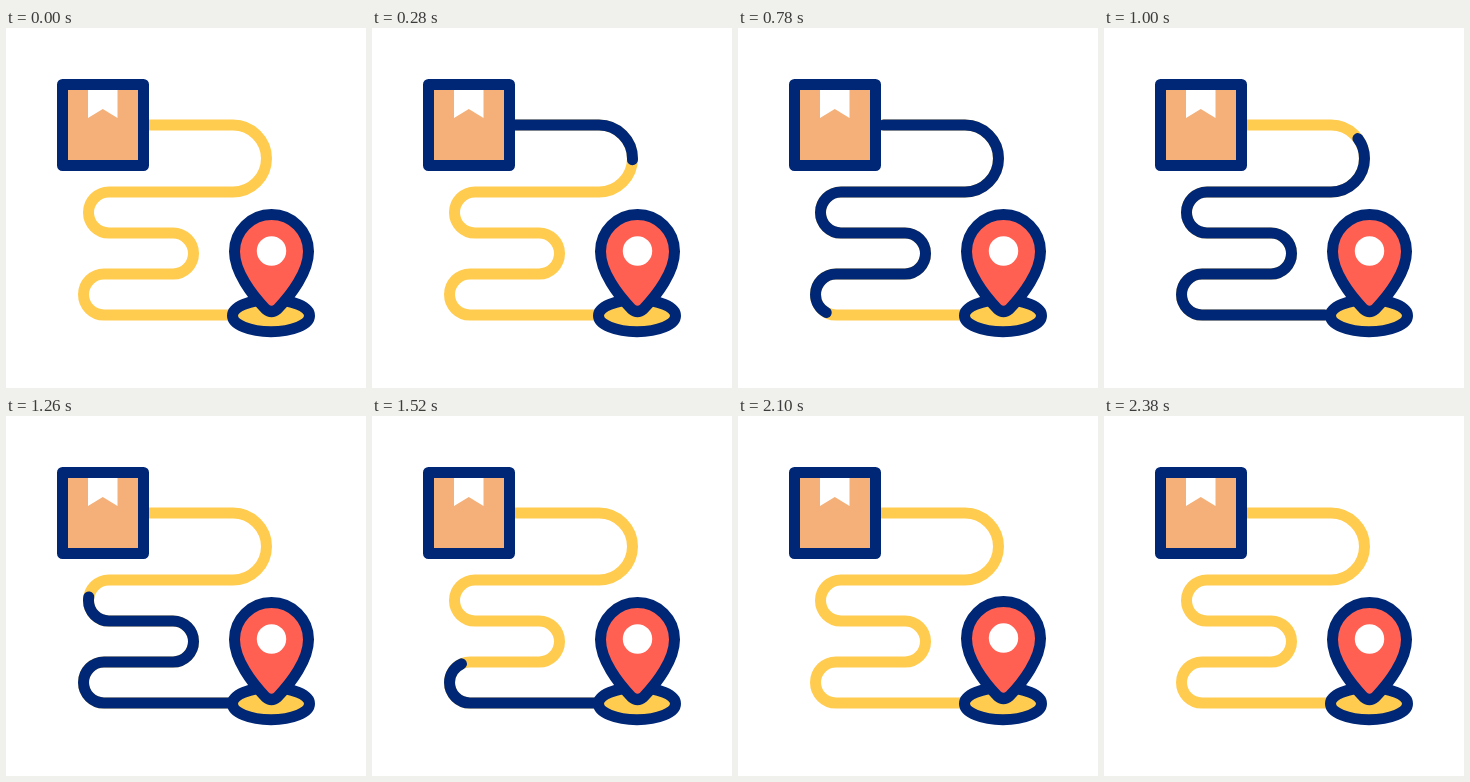
Write an HTML page with a canvas that moves like this. It is 360 px wide and 360 px high and loops after 2.4 s.

```html
<!DOCTYPE html>
<html>
<head>
<meta charset="utf-8">
<title>Delivery route</title>
<style>
html, body { margin: 0; width: 100%; height: 100%; overflow: hidden; background: #fff; }
canvas { display: block; width: 360px; height: 360px; }
</style>
</head>
<body>
<canvas id="stage" width="360" height="360"></canvas>
<script>
const ctx = document.getElementById('stage').getContext('2d');
const LOOP = 2400;
const NAVY = '#002776', YELLOW = '#ffcc50', RED = '#ff6052', CARD = '#f4b078', WHITE = '#fff';

const route = new Path2D(
  'M134 97H227A33.5 33.5 0 0 1 227 164H103A20.5 20.5 0 0 0 103 205' +
  'H167A20.5 20.5 0 0 1 167 246H98A20.5 20.5 0 0 0 98 287H234');
const routeLength = 93 + 124 + 64 + 69 + 136 + Math.PI * (33.5 + 3 * 20.5);

const box = new Path2D('M56.5 56.5H137.5V137.5H56.5Z');
const ribbon = new Path2D('M82 61H111.5V90L96.8 81L82 90Z');
const pin = new Path2D(
  'M265.5 186.5C245 186.5 228.5 203 228.5 223.5C228.5 244 246 267 259.5 281' +
  'Q265.5 286 271.5 281C285 267 302.5 244 302.5 223.5C302.5 203 286 186.5 265.5 186.5Z');
const hole = new Path2D();
hole.arc(265.5, 223, 14.7, 0, Math.PI * 2);
const base = new Path2D();
base.ellipse(265, 287.7, 38.5, 16, 0, 0, Math.PI * 2);

const clamp = u => Math.min(1, Math.max(0, u));

function ease(t, start, duration) {
  const u = clamp((t - start) / duration);
  return u * u * (3 - 2 * u);
}

function hop(t, start, duration, height) {
  const u = clamp((t - start) / duration);
  return 4 * height * u * (1 - u);
}

// A full hop followed by a lower, shorter one.
function bounce(t, start, duration, height) {
  return hop(t, start, duration, height) +
    hop(t, start + duration, duration * 0.8, height * 0.58);
}

function stroke(path, color) {
  ctx.strokeStyle = color;
  ctx.stroke(path);
}

function fill(path, color) {
  ctx.fillStyle = color;
  ctx.fill(path);
}

function raised(height, paint) {
  ctx.save();
  ctx.translate(0, -height);
  paint();
  ctx.restore();
}

function drawRoute(t) {
  stroke(route, YELLOW);
  const head = routeLength * ease(t, -29, 1121);
  const tail = routeLength * ease(t, 693, 1223);
  if (head - tail < 0.5) return;
  ctx.save();
  ctx.setLineDash([head - tail, routeLength * 2]);
  ctx.lineDashOffset = -tail;
  stroke(route, NAVY);
  ctx.restore();
}

function draw(t) {
  ctx.fillStyle = WHITE;
  ctx.fillRect(0, 0, 360, 360);
  ctx.lineWidth = 11;
  ctx.lineCap = ctx.lineJoin = 'round';

  drawRoute(t);

  raised(bounce(t, 300, 190, 14), () => {
    fill(box, CARD);
    fill(ribbon, WHITE);
    stroke(box, NAVY);
  });

  fill(base, YELLOW);
  stroke(base, NAVY);

  raised(bounce(t, 1765, 190, 11), () => {
    fill(pin, RED);
    stroke(pin, NAVY);
    fill(hole, WHITE);
  });
}

const began = performance.now();
function tick() {
  draw((performance.now() - began) % LOOP);
  requestAnimationFrame(tick);
}
tick();
</script>
</body>
</html>
```
